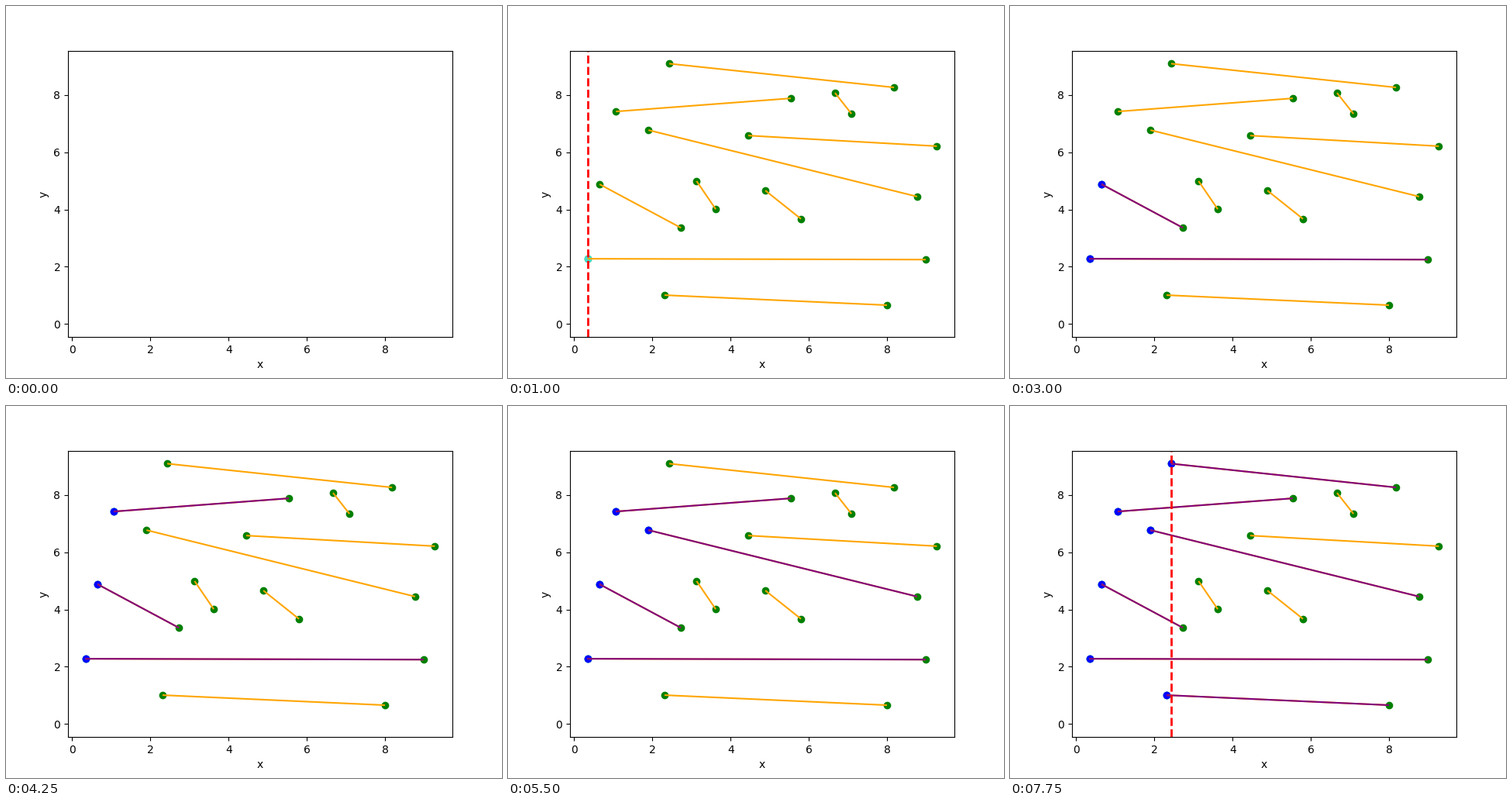
Animation of 640x480 px, one loop 8 s. Source, as a matplotlib script:

```python
import matplotlib.pyplot as plt
from matplotlib.animation import FuncAnimation

FRAMES = 32
INTERVAL = 250
STEPS = 5  # frames per sweep event
VISITED = 6
MARGIN = 0.05

# Key points: both ends of each segment, sorted by left x
SEGMENTS = [
    ((0.34, 2.28), (8.99, 2.25)),
    ((0.65, 4.88), (2.73, 3.36)),
    ((1.07, 7.42), (5.54, 7.88)),
    ((1.90, 6.77), (8.77, 4.45)),
    ((2.31, 1.01), (8.00, 0.66)),
    ((2.43, 9.09), (8.18, 8.26)),
    ((3.13, 4.99), (3.62, 4.01)),
    ((4.45, 6.58), (9.276, 6.21)),
    ((4.89, 4.66), (5.80, 3.67)),
    ((6.67, 8.07), (7.09, 7.34)),
]

fig, ax = plt.subplots(figsize=(6.4, 4.8), dpi=100)
ax.set_xlabel("x")
ax.set_ylabel("y")

timeline = []  # (artist, first frame, end frame)


def show(artist, start, end=FRAMES):
    timeline.append((artist, start, end))


def draw_line(segment, color):
    return ax.plot(*zip(*segment), color=color, solid_capstyle="butt")[0]


def draw_dots(points, color):
    return ax.scatter(*zip(*points), color=color)


def padded(low, high):
    pad = MARGIN * (high - low)
    return low - pad, high + pad


xs, ys = zip(*(point for seg in SEGMENTS for point in seg))
ax.set_xlim(padded(min(xs), max(xs)))
ax.set_ylim(padded(0, max(ys)))

for seg in SEGMENTS:
    show(draw_dots(seg, "green"), 1)
    show(draw_line(seg, "orange"), 2)

# Each event: sweep line, highlight, visited line, visited dot, sweep removed
for k, seg in enumerate(SEGMENTS[:VISITED]):
    left = seg[0]
    start = 3 + STEPS * k
    sweep = ax.axvline(left[0], color="red", linestyle="--", linewidth=2)
    show(sweep, start, start + STEPS - 1)
    show(draw_dots([left], "turquoise"), start + 1)
    show(draw_line(seg, "purple"), start + 2)
    show(draw_dots([left], "blue"), start + 3)


def update(frame):
    for artist, start, end in timeline:
        artist.set_visible(start <= frame < end)
    return [artist for artist, _, _ in timeline]


anim = FuncAnimation(fig, update, frames=FRAMES, interval=INTERVAL,
                     repeat=True, repeat_delay=0, blit=False)
plt.show()
```
